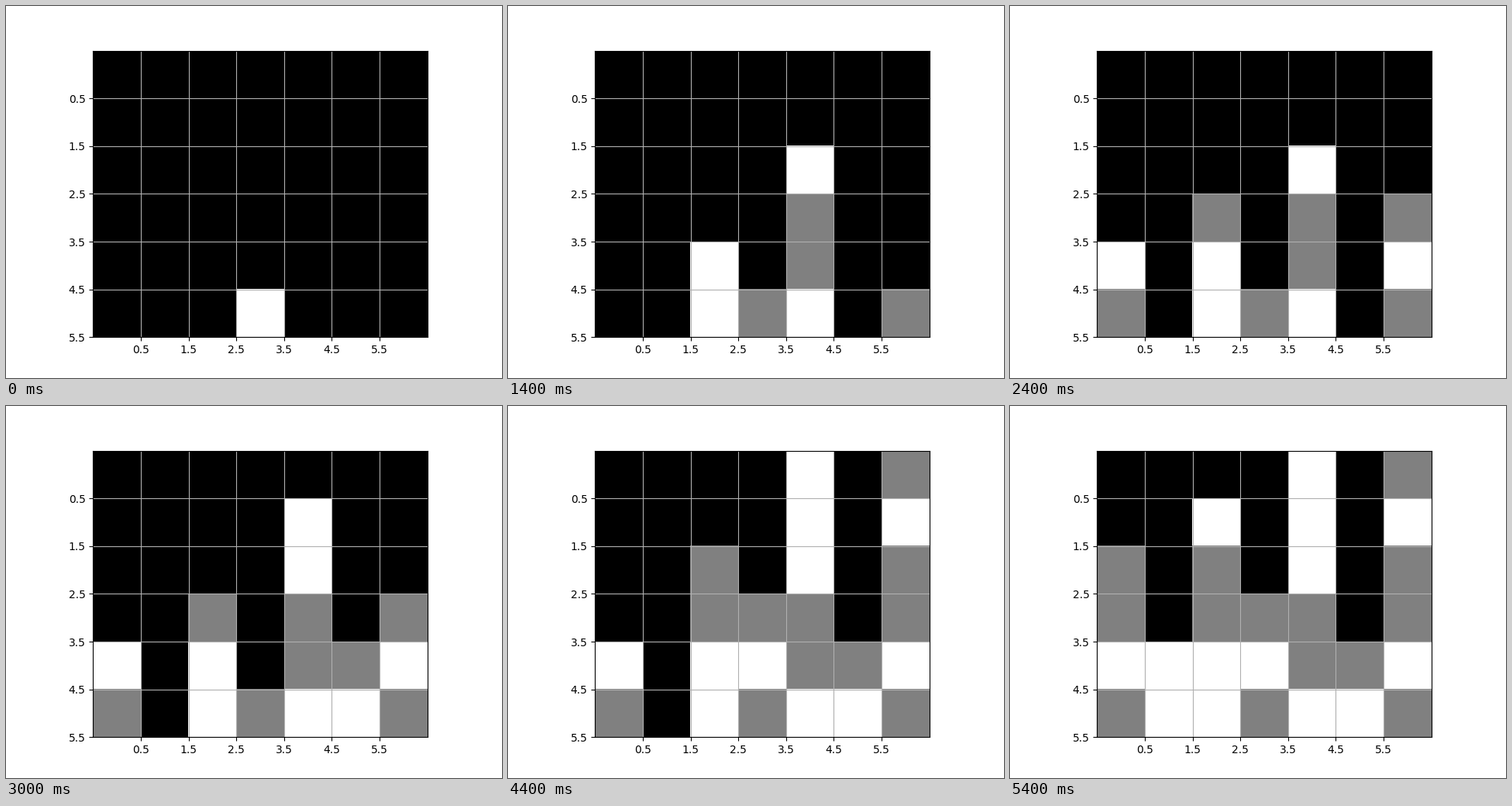
Recreate the animation shown at these times as a matplotlib script. Size 640 px wide and 480 px high, loop 5.6 s.

```python
import numpy as np
import matplotlib.pyplot as plt
from matplotlib.animation import FuncAnimation

ROWS, COLS = 6, 7
STEP_MS = 200

# Column chosen on each turn; the two players alternate.
MOVES = [3, 4, 4, 2, 6, 2, 4, 4, 0, 0, 2, 6, 6, 5,
         5, 4, 6, 3, 2, 6, 3, 4, 6, 1, 0, 2, 0, 1]


def board_after(turns):
    """Drop the first pieces one by one and return the board."""
    board = np.zeros((ROWS, COLS))
    for turn, col in enumerate(MOVES[:turns]):
        row = np.flatnonzero(board[:, col] == 0)[-1]
        board[row, col] = 1 + turn % 2
    return board


fig, ax = plt.subplots(figsize=(6.4, 4.8), dpi=100)
image = ax.imshow(board_after(1), cmap="gray")
ax.set_xticks(np.arange(0.5, COLS - 1))
ax.set_yticks(np.arange(0.5, ROWS))
ax.grid(True)


def draw(frame):
    board = board_after(frame + 1)
    image.set_data(board)
    # The brightest value is always white, even with a single piece.
    image.set_clim(0, board.max())
    return [image]


anim = FuncAnimation(fig, draw, frames=len(MOVES), interval=STEP_MS,
                     repeat=True, repeat_delay=0)
plt.show()
```
